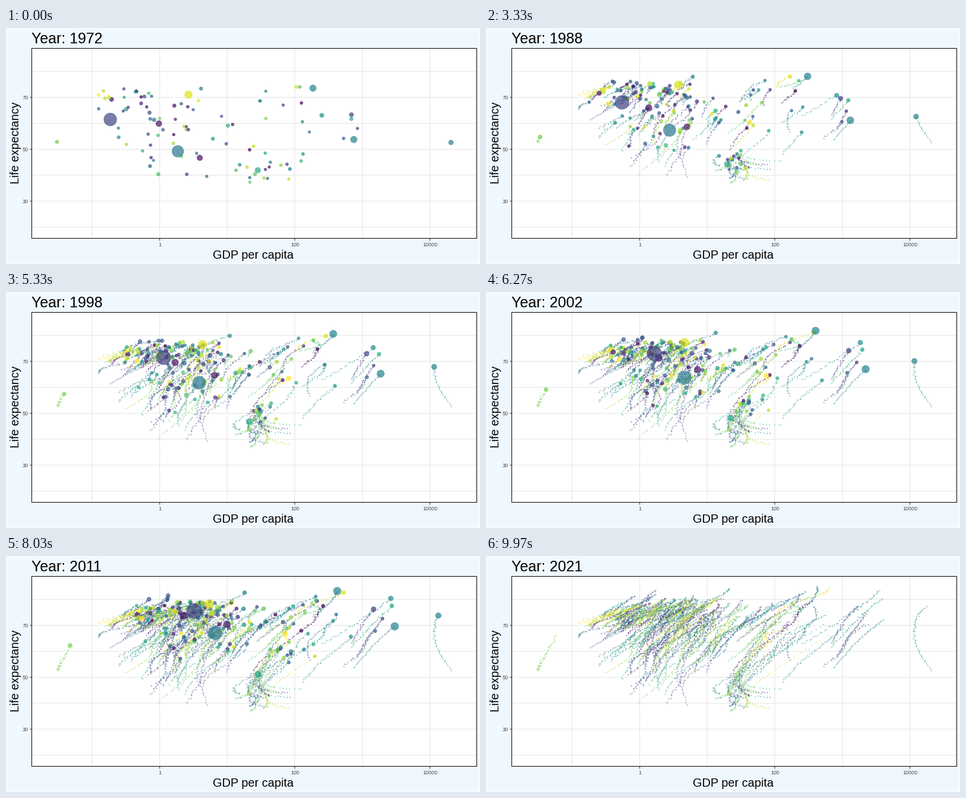
Write a matplotlib script that moves like this. It is 800 by 400 pixels and loops after 10 s.

```python
import numpy as np
import matplotlib
import matplotlib.pyplot as plt
from matplotlib.animation import FuncAnimation
from matplotlib.patches import Rectangle

W, H, DPI = 800, 400, 100
PX = 72 / DPI                      # points per pixel
FRAMES, LOOP_MS = 300, 10000
FIRST_YEAR, SPAN, LAST = 1972, 49, 48
YEARS = np.arange(LAST + 1)
ENTRY = np.round(YEARS * (FRAMES - 1) / SPAN)   # frame on which each year falls
GROWTH = 1.22                      # bubble radius, last year over first

rng = np.random.default_rng(11)
viridis = matplotlib.colormaps["viridis"]
countries = []                     # (x per year, y per year, birth, shade, radius)


def wobble(size, p):
    """Small yearly noise that leaves the starting point in place."""
    return size * rng.normal(0, 1, len(p)) * (p > 0)


def arc(shade, radius, start, middle, end):
    """A large country on a smooth curve through three points."""
    p = YEARS / LAST
    weights = np.array([(1 - p) * (1 - 2 * p), 4 * p * (1 - p), p * (2 * p - 1)])
    x, y = np.array([start, middle, end]).T @ weights
    calm = 3 / radius
    countries.append((x + wobble(1.3 * calm, p), y + wobble(0.9 * calm, p),
                      0, shade, radius))


def drift(x0, y0, born=0):
    """A small country that grows richer and healthier at its own pace."""
    share = (LAST - born) / LAST
    p = np.clip((YEARS - born) / (LAST - born), 0, 1)
    poor = x0 > 380 and y0 > 215
    goal = 60 + 0.5 * (y0 - 100) + 0.18 * max(0, 260 - x0) + rng.normal(0, 7)
    bend = 1.8 if poor else 0.85
    sway = rng.normal(0, 9) * share * np.sin(2 * np.pi * p)
    if poor:                       # drawn back to a shared low point at first
        sway = sway + (412 - x0 - 30) * 0.8 * np.sin(np.pi * p)
    x = x0 + rng.uniform(40, 105) * share * p + sway
    y = y0 + (goal - y0) * share * p ** bend
    radius = 2.2 + min(rng.exponential(0.35), 1.8)
    countries.append((x + wobble(1.1, p), np.maximum(y + wobble(0.8, p), 50),
                      born, rng.random(), radius))


def crowd(count, x_range, y_range, late=False):
    for _ in range(count):
        born = int(rng.triangular(1, 18, 25)) if late else 0
        drift(rng.uniform(*x_range), rng.uniform(*y_range), born)


crowd(27, (155, 335), (100, 142))
crowd(27, (182, 385), (142, 222))
crowd(5, (225, 360), (222, 252))
crowd(20, (385, 505), (198, 264))
crowd(8, (400, 500), (95, 160))
crowd(5, (500, 605), (130, 225))
crowd(42, (190, 340), (98, 132), late=True)
crowd(26, (240, 460), (98, 180), late=True)
crowd(16, (200, 450), (165, 235), late=True)

arc(.82, 3.0, (86, 193), (96, 174), (118, 135))
arc(.45, 4.0, (751, 194), (722, 132), (742, 86))
arc(.20, 3.6, (583, 147), (606, 108), (628, 84))
arc(.48, 3.5, (533, 148), (614, 98), (664, 58))
arc(.60, 4.6, (425, 241), (409, 223), (445, 182))
arc(.07, 4.7, (327, 220), (347, 147), (393, 103))
arc(.07, 5.0, (258, 162), (284, 122), (308, 91))
arc(.45, 5.4, (518, 102), (551, 73), (558, 52))
arc(.45, 5.5, (587, 189), (629, 142), (670, 108))
arc(.97, 6.4, (308, 113), (331, 90), (348, 80))
arc(.42, 9.8, (290, 209), (322, 158), (374, 117))
arc(.20, 10.8, (176, 155), (258, 114), (354, 84))

X, Y, births, shades, radii = (np.array(column) for column in zip(*countries))
shades = np.round(shades * 20) / 20
colors = viridis(shades)
colors[:, 3] = 0.7
alive = YEARS[None, :] >= births[:, None]

# Stage
plt.rcParams["font.family"] = "Liberation Sans"
fig = plt.figure(figsize=(W / DPI, H / DPI), dpi=DPI, facecolor="#F0F8FF")
ax = fig.add_axes([0, 0, 1, 1])
ax.set_xlim(0, W)
ax.set_ylim(H, 0)
ax.axis("off")


def rule(x, y, color, z=1):
    ax.plot(x, y, color=color, lw=PX, zorder=z, solid_capstyle="butt")


def frame(x0, y0, x1, y1, color):
    ax.add_patch(Rectangle((x0, y0), x1 - x0, y1 - y0, fill=False, ec=color,
                           lw=PX, zorder=6))


def label(x, y, text, size, color="black", ha="left", **kw):
    return ax.text(x, y, text, fontsize=size * PX, color=color, ha=ha,
                   va="baseline", **kw)


# Whole coordinates: one-pixel strokes snap to the pixel that starts there
L, R, T, B = 43, 794, 34, 356
frame(0, 0, W - 1, H - 1, "white")
ax.add_patch(Rectangle((L, T), R - L, B - T, fc="white", ec="none", zorder=0))
for k in range(6):
    rule([145 + 114 * k] * 2, [T, B], "#E5E5E5")
for k in range(7):
    rule([L, R], [73 + 44 * k] * 2, "#E5E5E5")
frame(L, T, R, B, "black")
for k, name in enumerate(["1", "100", "10000"]):
    x = 259 + 228 * k
    rule([x, x], [B, B + 4], "#333333", 5)
    label(x + 0.5, 370, name, 9, "#4D4D4D", "center")
for k, name in enumerate(["70", "50", "30"]):
    y = 117 + 88 * k
    rule([L - 3, L], [y, y], "#333333", 5)
    label(38, y + 4, name, 9, "#4D4D4D", "right")
label(417.5, 391, "GDP per capita", 20, ha="center")
label(22, 194.5, "Life expectancy", 20, ha="center", rotation=90,
      rotation_mode="anchor")
title = label(43, 25.5, "", 25)

trails = []
for shade in np.unique(shades):
    line, = ax.plot([], [], "o", ms=2 * PX, mew=0, alpha=0.58,
                    color=viridis(shade), zorder=3)
    trails.append((line, shades == shade))
bubbles = ax.scatter([], [], lw=0.7 * PX, zorder=4)


def draw(i):
    t = SPAN * i / (FRAMES - 1)
    title.set_text(f"Year: {FIRST_YEAR + int(t + 1e-9)}")

    past = alive & (ENTRY < i)[None, :]
    for line, group in trails:
        mask = past & group[:, None]
        line.set_data(X[mask], Y[mask])

    # The bubbles leave once the last recorded year is over
    on = (births <= t) & (i <= ENTRY[-1])
    t = min(t, LAST)
    a = min(int(t), LAST - 1)
    pos = np.column_stack([v[on, a] + (v[on, a + 1] - v[on, a]) * (t - a)
                           for v in (X, Y)])
    r = radii[on] * (1 + (GROWTH - 1) * t / LAST)
    bubbles.set_offsets(pos)
    bubbles.set_sizes((2 * r * PX) ** 2)
    bubbles.set_facecolor(colors[on])
    bubbles.set_edgecolor(colors[on])
    return [title, bubbles] + [line for line, _ in trails]


anim = FuncAnimation(fig, draw, frames=FRAMES, init_func=lambda: draw(0),
                     interval=LOOP_MS / FRAMES, repeat=True, repeat_delay=0)
plt.show()
```
